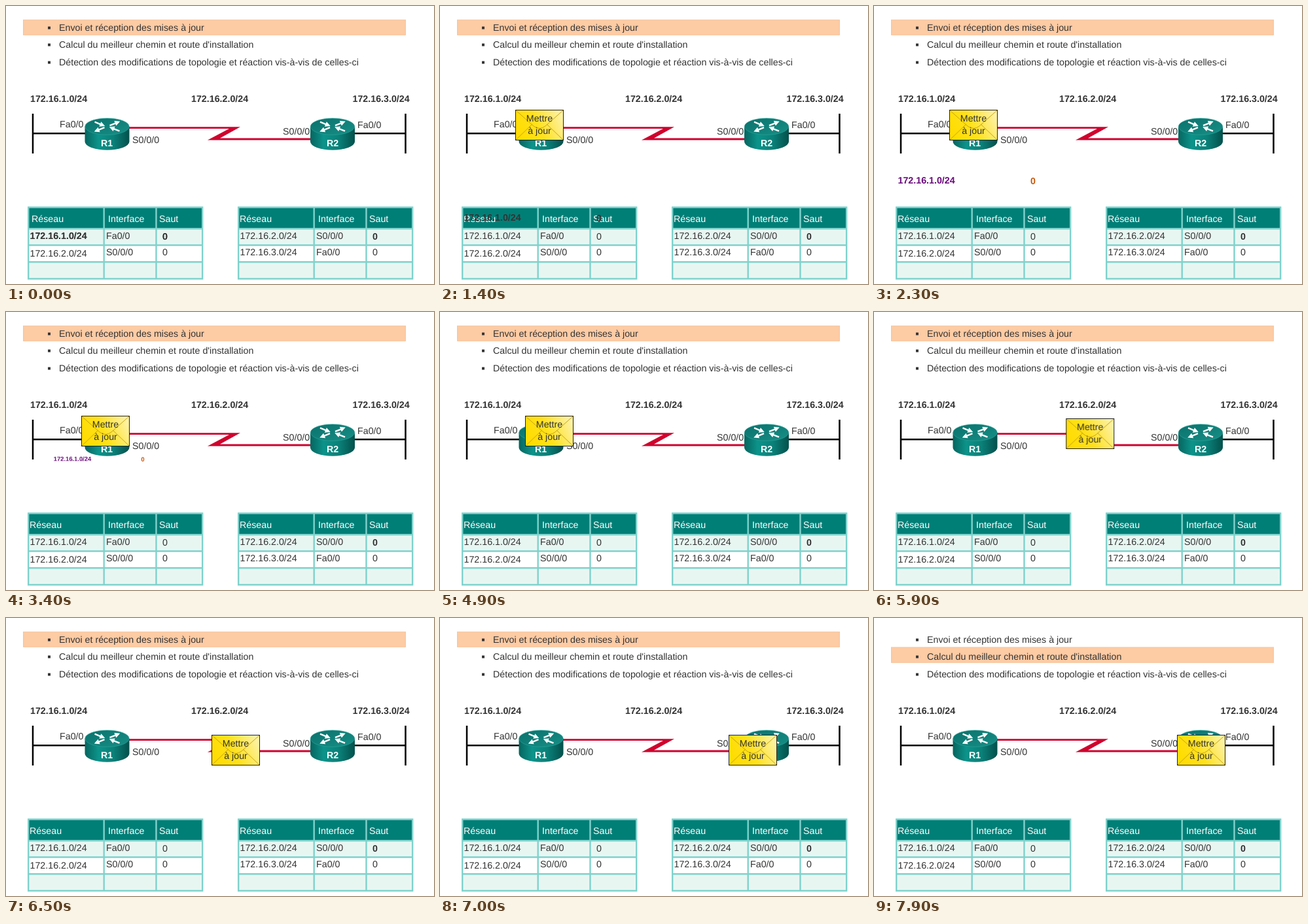
These frames come from a looping animation (654 px wide and 426 px high, 8000 ms). An HTML page:

```html
<!DOCTYPE html>
<html lang="fr">
<head>
<meta charset="utf-8">
<title>Mises à jour de routage</title>
<style>
  html, body { margin: 0; width: 100%; height: 100%; overflow: hidden; background: #fff; }
  svg { display: block; width: 654px; height: 426px; }
  text { font: 14.25px "Liberation Sans", Arial, sans-serif; fill: #333; text-rendering: geometricPrecision; }
  .b { font-weight: bold; }
  .w { fill: #fff; }
  .mid { text-anchor: middle; }

  /* 1.25% = 100 ms; the small delay keeps steps clear of rounding */
  .bar, .head, .entry, .entry text, .mail, .path {
    animation: 8s step-end -10ms infinite;
  }
  .bar { animation-name: bar; }
  .head { animation-name: head; }
  .entry { animation-name: entry; transform-origin: 143px 352px; }
  .entry .net { animation-name: net; }
  .entry .hop { animation-name: hop; }
  .mail { animation-name: mail; }
  .path { animation-name: path; }

  @keyframes bar {
    0% { transform: translateY(0); }
    92.5% { transform: translateY(0); animation-timing-function: steps(6, start); }
    100% { transform: translateY(23.5px); }
  }
  @keyframes head {
    0% { transform: translateX(3px); }
    15%, 100% { transform: translateX(0); }
  }
  @keyframes net {
    0% { fill: #333; }
    28.75%, 100% { fill: #6a0a7c; }
  }
  @keyframes hop {
    0% { fill: #333; }
    28.75%, 100% { fill: #c8590c; }
  }
  @keyframes entry {
    0% { transform: translateY(0) scale(1); opacity: 1; }
    16.25% { transform: translateY(0) scale(1); opacity: 1; animation-timing-function: steps(3, start); }
    20% { transform: translateY(-42px) scale(1); opacity: 1; }
    21.25% { transform: translateY(-42px) scale(1); opacity: 1; animation-timing-function: steps(4, start); }
    26.25% { transform: translateY(-85px) scale(1); opacity: 1; }
    35% { transform: translateY(-85px) scale(1); opacity: 1; animation-timing-function: steps(14, start); }
    52.49% { transform: translateY(-169px) scale(.32); opacity: 1; }
    52.5%, 100% { transform: translateY(-169px) scale(.32); opacity: 0; }
  }
  @keyframes mail {
    0% { opacity: 0; }
    6.25% { opacity: 0; animation-timing-function: steps(4, start); }
    11.25%, 100% { opacity: 1; }
  }
  @keyframes path {
    0% { transform: translate(0, 0); }
    61.25% { transform: translate(15px, 0); animation-timing-function: steps(9); }
    72.5% { transform: translate(185px, 0); animation-timing-function: steps(5); }
    78.75% { transform: translate(151px, 20px); animation-timing-function: steps(3); }
    82.5% { transform: translate(223px, 20px); animation-timing-function: steps(4); }
    87.5% { transform: translate(326px, 20px); }
    88.75%, 100% { transform: translate(348px, 20px); }
  }
</style>
</head>
<body>
<svg viewBox="0 0 654 426">
  <defs>
    <linearGradient id="side">
      <stop offset="0" stop-color="#06655f"/>
      <stop offset=".3" stop-color="#0c938a"/>
      <stop offset=".65" stop-color="#0a8078"/>
      <stop offset="1" stop-color="#03504c"/>
    </linearGradient>
    <linearGradient id="lid" x2="1" y2="1">
      <stop offset="0" stop-color="#0a716b"/>
      <stop offset="1" stop-color="#178f87"/>
    </linearGradient>
    <linearGradient id="gold" x1="0" y1=".6" x2="1" y2=".3">
      <stop offset="0" stop-color="#ffdc00"/>
      <stop offset=".45" stop-color="#ffe11c"/>
      <stop offset="1" stop-color="#fdf2a6"/>
    </linearGradient>
    <path id="arrow" d="M0 -1.2H9V-4L17 0L9 4V1.2H0Z"/>
    <g id="router">
      <path d="M-34 0V23A34 13 0 0 0 34 23V0Z" fill="url(#side)"/>
      <ellipse rx="33.7" ry="12.7" fill="url(#lid)" stroke="#2aa198" stroke-width=".7"/>
      <g fill="#fff">
        <use href="#arrow" transform="translate(-19 -7) rotate(22)"/>
        <use href="#arrow" transform="translate(19 7) rotate(202)"/>
        <use href="#arrow" transform="translate(4 -1.5) rotate(-22)"/>
        <use href="#arrow" transform="translate(-4 1.5) rotate(158)"/>
      </g>
    </g>
    <g id="grid">
      <path d="M34 308.5H300V341H34Z" fill="#007f77"/>
      <path d="M34 341H300V366.5H34ZM34 392H300V418H34Z" fill="#e8f6f2"/>
      <path d="M34.2 308.5H300.2V418H34.2ZM34 341.2H300M34 366.5H300M34 392.2H300M149.7 308V418M229.5 308V418"
        fill="none" stroke="#80d2cc" stroke-width="2.4"/>
      <text class="w" x="156" y="331">Interface</text>
      <text class="w" x="234" y="331">Saut</text>
    </g>
  </defs>

  <rect class="bar" x="26.5" y="21.3" width="584" height="23" fill="#fdcba4" stroke="#f7c499"/>
  <path d="M64 31.5h4v4h-4zM64 57.5h4v4h-4zM64 84.5h4v4h-4z" fill="#333"/>
  <text x="81" y="38">Envoi et réception des mises à jour</text>
  <text x="81" y="64">Calcul du meilleur chemin et route d'installation</text>
  <text x="81" y="91">Détection des modifications de topologie et réaction vis-à-vis de celles-ci</text>

  <g class="nets">
    <text class="b" x="37" y="147">172.16.1.0/24</text>
    <text class="b" x="283" y="147">172.16.2.0/24</text>
    <text class="b" x="529.5" y="147">172.16.3.0/24</text>
  </g>

  <path d="M41 165V226M41 195.3H124M610.5 165V226M530 195.3H610" fill="none" stroke="#000" stroke-width="2.5"/>
  <path d="M186 185.2H358L327 202.6H468V205.4H308L341 188H186Z" fill="#d0022e"/>
  <use href="#router" x="154.5" y="184.7"/>
  <use href="#router" x="499" y="184.7"/>
  <text class="b w mid" x="154" y="215">R1</text>
  <text class="b w mid" x="499" y="215">R2</text>
  <text x="82" y="186">Fa0/0</text>
  <text x="193" y="210">S0/0/0</text>
  <text x="423" y="197">S0/0/0</text>
  <text x="537" y="187">Fa0/0</text>

  <use href="#grid"/>
  <use href="#grid" x="321"/>
  <text class="w head" x="36" y="331">Réseau</text>
  <text class="w" x="357" y="331">Réseau</text>

  <text x="36.5" y="357">172.16.1.0/24</text>
  <text x="153" y="357">Fa0/0</text>
  <text x="239" y="358">0</text>
  <text x="36.5" y="384">172.16.2.0/24</text>
  <text x="153" y="382">S0/0/0</text>
  <text x="239" y="382">0</text>

  <text x="357.5" y="357">172.16.2.0/24</text>
  <text x="474" y="357">S0/0/0</text>
  <text class="b" x="560" y="358">0</text>
  <text x="357.5" y="382">172.16.3.0/24</text>
  <text x="474" y="382">Fa0/0</text>
  <text x="560" y="382">0</text>

  <g class="path">
    <g class="mail">
      <rect x="115.5" y="159.5" width="73" height="46" fill="url(#gold)"/>
      <path d="M116 205L141 181M188 205L163 181M116 160L143 184Q152 191 161 184L188 160"
        fill="none" stroke="#c9a412"/>
      <rect x="115.5" y="159.5" width="73" height="46" fill="none" stroke="#222"/>
      <text class="mid" x="152" y="177">Mettre</text>
      <text class="mid" x="152" y="196">à jour</text>
    </g>
  </g>

  <g class="entry">
    <text class="b net" x="36.5" y="357">172.16.1.0/24</text>
    <text class="b hop" x="239" y="358">0</text>
  </g>
</svg>
</body>
</html>
```
